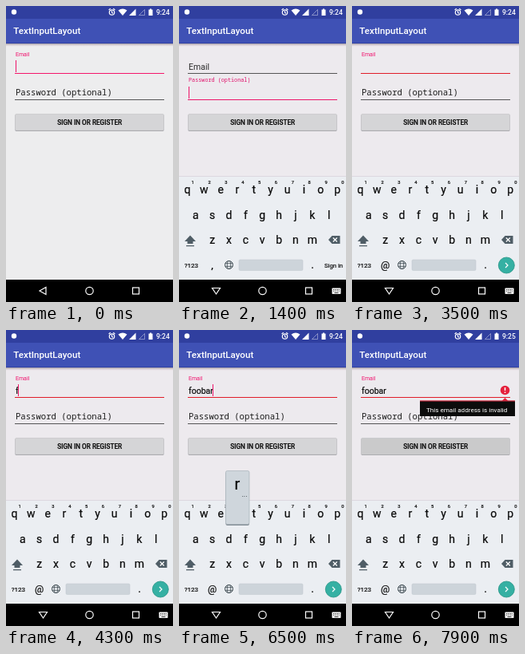
These frames come from a looping animation (209 px wide and 371 px high, 8000 ms). An HTML page:

```html
<!DOCTYPE html>
<html lang="en">
<head>
<meta charset="utf-8">
<title>TextInputLayout</title>
<style>
  html, body { margin: 0; width: 100%; height: 100%; overflow: hidden; background: #ededee; }
  svg { display: block; width: 100vw; height: 100vh; }
  text { font-family: Roboto, Inter, sans-serif; white-space: pre; }
  .mid { text-anchor: middle; }
  .mono { font-family: "Noto Sans Mono", "DejaVu Sans Mono", monospace; }
  .ink { fill: #080808; stroke: #080808; stroke-width: .2; }
  .label { animation: 8s ease-in-out infinite; }
  #emailLabel { font-size: 10.5px; animation-name: email; }
  #passLabel { font-size: 10.6px; animation-name: pass; }
  #keyboard { animation: slide 8s infinite; }
  .icon { fill: #4f5d66; }
  .line { fill: none; stroke: #fff; stroke-width: 1.2; }
  .rule { x: 11px; width: 187px; height: 1px; }

  @keyframes email {
    0%, 3.75% { transform: translate(12px, 63px) scale(.667); fill: #f0106c; }
    6.25%, 25% { transform: translate(12px, 79.6px); fill: #2a2a2a; }
    27.5%, 100% { transform: translate(12px, 63px) scale(.667); fill: #f0106c; }
  }
  @keyframes pass {
    0%, 3.75% { transform: translate(12px, 111.7px); fill: #1c1c1c; }
    6.25%, 25% { transform: translate(12px, 95px) scale(.642); fill: #e0106a; }
    27.5%, 100% { transform: translate(12px, 111.7px); fill: #1c1c1c; }
  }
  @keyframes slide {
    0%, 6.25% { transform: translateY(131px); animation-timing-function: ease-out; }
    10%, 100% { transform: none; }
  }
</style>
</head>
<body>
<svg viewBox="0 0 209 371" preserveAspectRatio="none">
  <defs>
    <linearGradient id="shade" x2="0" y2="1">
      <stop stop-color="#403848" stop-opacity=".45"/>
      <stop offset="1" stop-color="#e0b0c0" stop-opacity="0"/>
    </linearGradient>
  </defs>
  <rect width="209" height="371" fill="#ededee"/>
  <rect width="209" height="371" fill="#edeaee" data-on="400-8000"/>

  <!-- status and app bar -->
  <rect width="209" height="16" fill="#303f9f"/>
  <rect y="16" width="209" height="31" fill="#3f51b5"/>
  <rect y="46" width="209" height="1" fill="#3041a4"/>
  <rect y="47" width="209" height="4" fill="url(#shade)"/>
  <circle cx="10" cy="7.5" r="3.2" fill="#fff"/>
  <g class="line">
    <circle cx="132.5" cy="8" r="3.2"/>
    <path d="M132.5 6v2.2l1.6 1M128.6 5l2.2-1.9M136.4 5l-2.2-1.9"/>
    <path d="M173.5 4.5v7h-7Z" stroke-width=".7" opacity=".6"/>
  </g>
  <g fill="#fff">
    <path d="M140.5 5.5Q146 1.5 151.5 5.5L146 12Z"/>
    <path d="M162.5 3.5v8.500h-8.500Z"/>
    <path d="M178.500 4.500h1.500v-1h2v1h1.500v7.500h-5Z"/>
    <text id="clock" x="188" y="11" font-size="8.500" font-weight="500">9:24</text>
    <text x="9.300" y="35" font-size="11.600" font-weight="500">TextInputLayout</text>
  </g>

  <!-- form -->
  <rect class="rule" y="84" fill="#555"/>
  <rect class="rule" y="84" fill="#f5156a" data-on="0-300"/>
  <rect class="rule" y="84" fill="#e01c28" data-on="2000-8000"/>
  <rect class="rule" y="117" fill="#555"/>
  <rect class="rule" y="117" fill="#ec1468" data-on="300-2000"/>
  <text class="label" id="emailLabel">Email</text>
  <text class="label mono" id="passLabel">Password (optional)</text>
  <text class="ink" id="typed" x="12" y="79.600" font-size="10.500"></text>
  <rect id="caret" width="1" height="15" fill="#ee1468"
    data-on="0-300,300-800,1300-1800,2000-2500,3000-3500,4100-6900,7400-7850"/>
  <rect x="11.500" y="136" width="186" height="21" rx="1.500" fill="#a4a4a8"/>
  <rect x="11.500" y="135.500" width="186" height="20.500" rx="1.500" fill="#d5d5d7" stroke="#c2c2c5" stroke-width=".6"/>
  <rect x="11.500" y="135.500" width="186" height="20.500" rx="1.500" fill="#cacacb" data-on="7100-8000"/>
  <text class="mid ink" x="104.700" y="148.500" font-size="8.200" font-weight="500">SIGN IN OR REGISTER</text>

  <!-- validation message -->
  <g data-on="7300-8000">
    <circle cx="191.500" cy="75.500" r="5.800" fill="#e5213c"/>
    <path d="M191.500 72v4M191.500 77.500v1.500" stroke="#fff" stroke-width="1.500"/>
    <path d="M187.500 89l4-4 4 4Z" fill="#e5213c"/>
    <rect x="85" y="89" width="119" height="19" fill="#0c0c0c"/>
    <rect x="85" y="88.300" width="119" height="1.200" fill="#c5263a"/>
    <text x="93" y="102.500" font-size="8.100" fill="#fff">This email address is invalid</text>
  </g>

  <g id="keyboard">
    <rect y="213" width="209" height="131" fill="#ebeef2"/>
    <rect y="213" width="209" height="1" fill="#dcd8df"/>
    <g id="keys" class="mid ink"></g>
    <path class="icon" d="M14 287.500l7 7.500h-3.500v3h-7v-3H7ZM9 300h10v1.200h-10Z"/>
    <path class="icon" d="M187 293l4.500-5H201.500v10H191.500Z"/>
    <path class="line" d="M192.800 290.500l5 5m0-5l-5 5"/>
    <text class="ink" x="6.700" y="328" font-size="8.100">?123</text>
    <text class="mid ink" x="41.500" y="329" font-size="13" data-on="0-2100">,</text>
    <text class="mid ink" x="41.500" y="329" font-size="12.500" data-on="2100-8000">@</text>
    <g fill="none" stroke="#39464d">
      <circle cx="62.500" cy="324.500" r="5"/>
      <ellipse cx="62.500" cy="324.500" rx="2.200" ry="5" stroke-width=".8"/>
      <path d="M58 322.700h9M58 326.300h9" stroke-width=".8"/>
    </g>
    <rect x="75" y="318" width="80" height="13.500" rx="1.500" fill="#cdd4da" stroke="#bfc7cd" stroke-width=".5"/>
    <text class="mid ink" x="167" y="329" font-size="14">.</text>
    <text class="mid ink" x="193.500" y="328" font-size="7.700" data-on="0-2100">Sign in</text>
    <g data-on="2100-8000">
      <circle cx="193.300" cy="325" r="10" fill="#35b0a3" stroke="#249485" stroke-width=".8"/>
      <path class="line" d="M192 322l3 3-3 3"/>
    </g>
  </g>

  <g id="popup">
    <rect x="-14.500" y="-57" width="29.500" height="67.500" rx="2" fill="#7f8a92"/>
    <rect x="-14.500" y="-58" width="29.500" height="67" rx="2" fill="#cfd6dc" stroke="#aab3ba" stroke-width=".7"/>
    <text id="big" class="mid ink" y="-34.500" font-size="20"></text>
    <text id="more" class="mid" x="9" y="-26" font-size="9" fill="#333b40">...</text>
  </g>

  <!-- navigation bar -->
  <rect y="343" width="209" height="28"/>
  <g class="line">
    <path d="M42 357l8-4.500v9Z" data-on="0-500"/>
    <path d="M41.500 353.500h10l-5 7.500Z" data-on="500-8000"/>
    <circle cx="104.500" cy="357" r="4.700"/>
    <rect x="158.500" y="353" width="8" height="8"/>
  </g>
  <g fill="#fff" data-on="500-8000">
    <rect x="191.500" y="353.500" width="11" height="7.500" rx=".8"/>
    <path d="M193 355.500h8M193 357.300h8" stroke="#000" stroke-width=".8" stroke-dasharray="1 .7"/>
    <path d="M194.500 359.500h5" stroke="#000" stroke-width=".8"/>
  </g>
</svg>
<script>
  const LOOP = 8000, STEP = 20.85;
  const $ = id => document.getElementById(id);
  const rows = [
    { chars: 'qwertyuiop', x: STEP / 2, y: 234.5 },
    { chars: 'asdfghjkl', x: STEP, y: 266.5 },
    { chars: 'zxcvbnm', x: STEP * 2, y: 298 }
  ];
  const spots = {};

  function addKey(char, x, y, size) {
    const el = document.createElementNS('http://www.w3.org/2000/svg', 'text');
    el.setAttribute('x', x);
    el.setAttribute('y', y);
    el.setAttribute('font-size', size);
    el.textContent = char;
    $('keys').append(el);
  }

  rows.forEach((row, r) => [...row.chars].forEach((char, i) => {
    const x = row.x + i * STEP;
    spots[char] = { x, y: row.y, more: r === 0 };
    addKey(char, x, row.y, 14);
    if (r === 0) addKey((i + 1) % 10, x + 6.8, 223, 5.8);
  }));

  // key, popup start, letter typed, popup end
  const presses = [
    ['f', 3950, 4100, 4220], ['o', 4480, 4600, 4720], ['o', 4850, 4970, 5080],
    ['b', 5220, 5400, 5500], ['a', 5720, 5900, 6000], ['r', 6220, 6400, 6570]
  ];
  const timed = [...document.querySelectorAll('[data-on]')].map(el => ({
    el, spans: el.dataset.on.split(',').map(s => s.split('-').map(Number))
  }));

  function show(el, on) {
    el.style.visibility = on ? 'visible' : 'hidden';
  }

  function render(t) {
    for (const { el, spans } of timed) show(el, spans.some(([a, b]) => t >= a && t < b));

    const typed = $('typed');
    typed.textContent = presses.filter(p => t >= p[2]).map(p => p[0]).join('');
    const inPass = t >= 300 && t < 2000;
    const width = typed.textContent ? typed.getComputedTextLength() : 0;
    $('caret').setAttribute('x', Math.floor(12 + width));
    $('caret').setAttribute('y', inPass ? 101 : 68);

    const press = presses.find(p => t >= p[1] && t < p[3]);
    $('popup').style.display = press ? '' : 'none';
    if (press) {
      const { x, y, more } = spots[press[0]];
      $('popup').setAttribute('transform', `translate(${x} ${y})`);
      $('big').textContent = press[0];
      show($('more'), more);
    }
    $('clock').textContent = t < 7000 ? '9:24' : '9:25';
  }

  let start;
  function tick(now) {
    start ??= now;
    render((now - start) % LOOP);
    requestAnimationFrame(tick);
  }
  render(0);
  requestAnimationFrame(tick);
</script>
</body>
</html>
```
